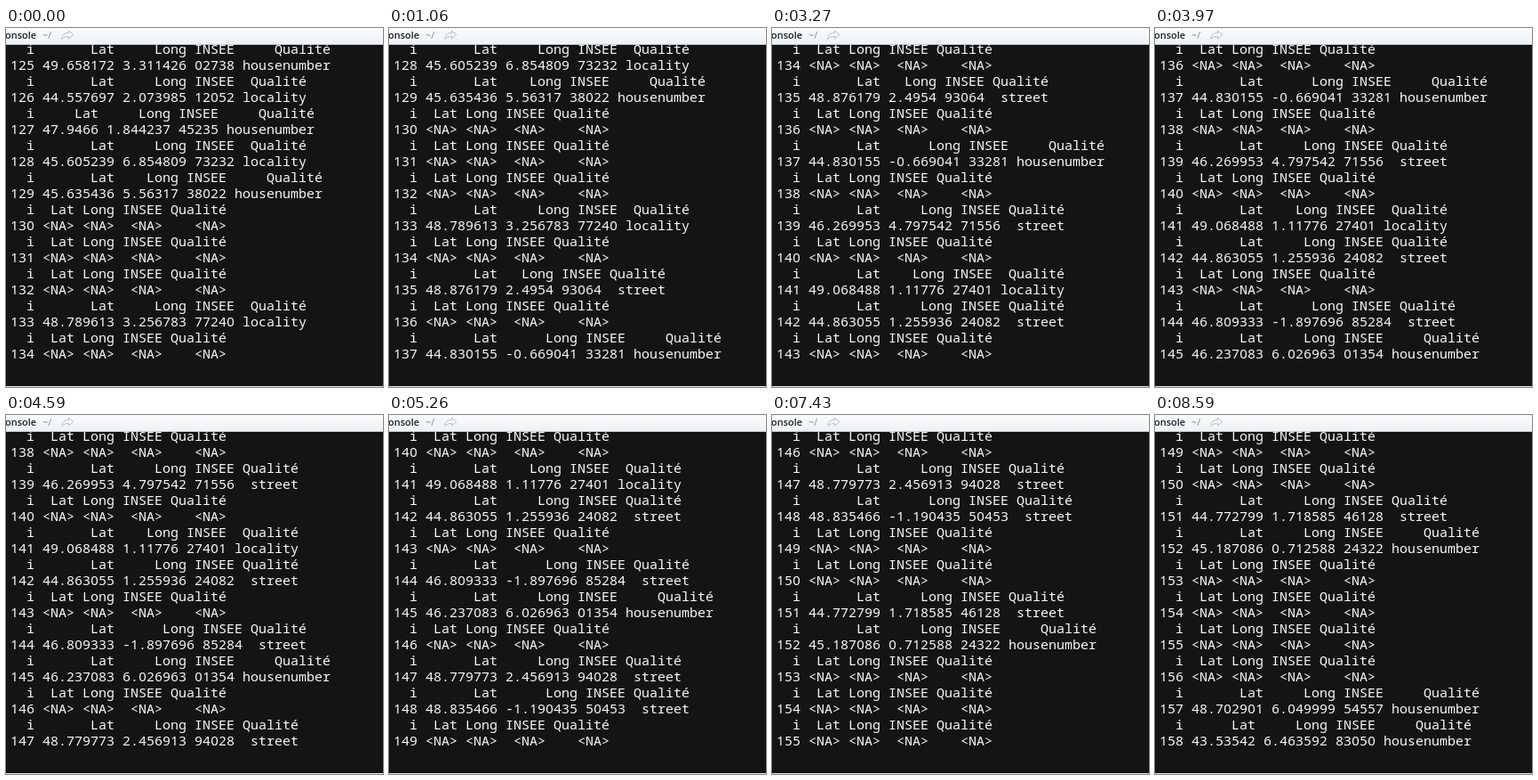
These frames come from a looping animation (424x403 px, 8.75 s). An HTML page:

```html
<!DOCTYPE html>
<html lang="fr">
<head>
<meta charset="utf-8">
<title>Console</title>
<style>
  html, body { margin: 0; width: 100%; height: 100%; overflow: hidden; background: #141414; }
  svg { display: block; }
  .out { font: 15px "Noto Sans Mono", monospace; fill: #f8f8f8; text-anchor: middle; white-space: pre; }
  .digits { font-family: "Noto Sans", sans-serif; }
  .title { font: 600 11px "Open Sans", sans-serif; fill: #17212b; }
  .path { font: 11px "Open Sans", sans-serif; fill: #85898d; }
</style>
</head>
<body>
<svg width="424" height="403" viewBox="0 0 424 403">
  <defs>
    <linearGradient id="bar" x2="0" y2="1">
      <stop offset="0" stop-color="#fafbfc"/>
      <stop offset="1" stop-color="#eef1f4"/>
    </linearGradient>
    <clipPath id="view"><rect y="19" width="424" height="383"/></clipPath>
  </defs>
  <rect width="424" height="403" fill="#141414"/>
  <g id="output" class="out" clip-path="url(#view)"></g>
  <rect width="424" height="18" fill="url(#bar)"/>
  <rect y="18" width="424" height="1" fill="#c6cbd0"/>
  <text class="title" x="-1" y="12">onsole</text>
  <text class="path" x="41" y="12">~/</text>
  <path d="M63 12.500C63 7.500 66 5.500 70.500 5.500V3L76 7.500L70.500 12V9.500C67 9.500 65 10 63 12.500Z"
        fill="#f6f8fb" stroke="#b3bdcc" stroke-linejoin="round"/>
  <rect y="402" width="424" height="1" fill="#e4e7ea"/>
</svg>
<script>
const LOOP = 8750;
const CELL = 9, LEFT = 5, LINE = 18, LAST_BASELINE = 371;
const FIRST_ID = 125, VISIBLE = 10;
const HEADERS = ["Lat", "Long", "INSEE", "Qualité"];
const MISSING = Array(4).fill("<NA>");

// One record per line; "-" is a record without a match.
const records = `49.658172 3.311426 02738 housenumber
44.557697 2.073985 12052 locality
47.9466 1.844237 45235 housenumber
45.605239 6.854809 73232 locality
45.635436 5.56317 38022 housenumber
-
-
-
48.789613 3.256783 77240 locality
-
48.876179 2.4954 93064 street
-
44.830155 -0.669041 33281 housenumber
-
46.269953 4.797542 71556 street
-
49.068488 1.11776 27401 locality
44.863055 1.255936 24082 street
-
46.809333 -1.897696 85284 street
46.237083 6.026963 01354 housenumber
-
48.779773 2.456913 94028 street
48.835466 -1.190435 50453 street
-
-
44.772799 1.718585 46128 street
45.187086 0.712588 24322 housenumber
-
-
-
-
48.702901 6.049999 54557 housenumber
43.53542 6.463592 83050 housenumber`.split("\n");

// Times at which each further record is printed.
const printTimes = [
  360, 730, 1060, 1470, 1800, 2180, 2560, 2880, 3270, 3660, 3970, 4280,
  4590, 4950, 5260, 5660, 5960, 6270, 6730, 7030, 7430, 7830, 8210, 8430
];

// Right-align a record under its headers, as a printed data frame.
function formatRecord(record, index) {
  const values = record === "-" ? MISSING : record.split(" ");
  const widths = values.map((v, i) => Math.max(v.length, HEADERS[i].length));
  const row = (label, cells) =>
    [label, ...cells.map((c, i) => c.padStart(widths[i]))].join(" ");
  return [row("  i", HEADERS), row(String(FIRST_ID + index), values)];
}

// Centre every character in its own fixed-width cell.
function lineMarkup(line, y) {
  const spans = [...line.matchAll(/\d+|[^\d\s]+/g)].map(({ 0: run, index }) => {
    const xs = [...run].map((_, i) => LEFT + (index + i + 0.5) * CELL).join(" ");
    const style = /\d/.test(run) ? ' class="digits"' : "";
    return `<tspan x="${xs}"${style}>${run.replace(/</g, "&lt;")}</tspan>`;
  });
  return `<text y="${y}">${spans.join("")}</text>`;
}

const lines = records.flatMap(formatRecord);
const output = document.getElementById("output");
let shown = -1;

function render(time) {
  const printed = printTimes.filter(t => t <= time).length;
  if (printed === shown) return;
  shown = printed;
  const count = VISIBLE * 2;
  output.innerHTML = lines
    .slice(printed * 2, printed * 2 + count)
    .map((line, i) => lineMarkup(line, LAST_BASELINE - (count - 1 - i) * LINE))
    .join("");
}

const start = performance.now();
function tick() {
  render((performance.now() - start) % LOOP);
  requestAnimationFrame(tick);
}
tick();
</script>
</body>
</html>
```
